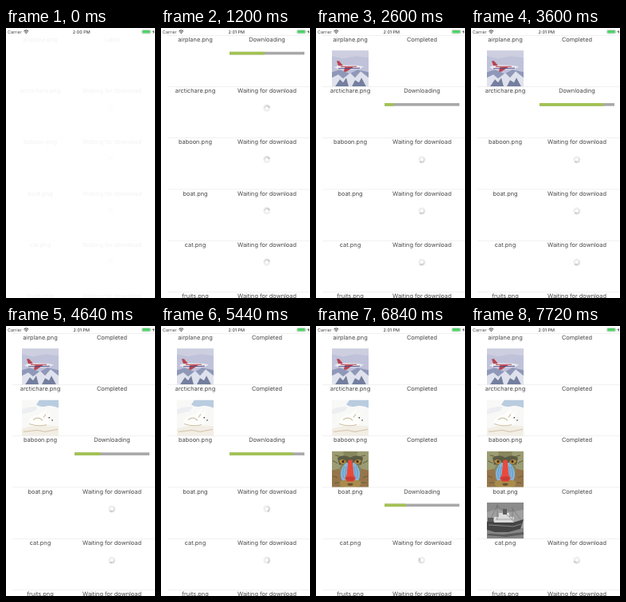
An HTML page that plays this animation: 187 by 338 pixels, repeating every 7.76 s.

```html
<!DOCTYPE html>
<html lang="en">
<head>
<meta charset="utf-8">
<title>Download list</title>
<style>
  html, body { margin: 0; width: 100%; height: 100%; overflow: hidden; background: #fff; }
  svg { display: block; }
  text { font-family: Inter, Roboto, "Liberation Sans", sans-serif; text-rendering: geometricPrecision; }
  .label { font-size: 7.4px; fill: #484848; text-anchor: middle; }
  .bar { font-size: 5.4px; fill: #444; }
</style>
</head>
<body>
<svg id="stage" width="187" height="338" viewBox="0 0 187 338">
  <g id="list"></g>
  <g id="status">
    <text class="bar" x="2" y="6.8">Carrier</text>
    <g fill="none" stroke="#333" stroke-width="1">
      <path d="M22.4 4.1a4.1 4.1 0 0 1 5.8 0M23.6 5.5a2.4 2.4 0 0 1 3.4 0"/>
    </g>
    <path d="M24.3 6.3h2l-1 1.2z" fill="#333"/>
    <text class="bar" id="clock" x="94.7" y="6.9" text-anchor="middle" font-weight="500"></text>
    <rect x="170.5" y="2.5" width="11" height="4.6" rx="1.2" fill="#fff" stroke="#aaa" stroke-width=".5"/>
    <rect x="171.2" y="3.1" width="9.6" height="3.4" rx=".7" fill="#4cd266"/>
    <path d="M182.3 4v1.6q.7-.2.7-.8t-.7-.8" fill="#aaa"/>
    <path d="M185.4 2.2l-1.6 2.9h1.2l-.5 2.3 1.9-3h-1.2z" fill="#333"/>
  </g>
</svg>
<script>
const LOOP = 7760, STEP = 40, PITCH = 64.25;
const NS = "http://www.w3.org/2000/svg";
const list = document.getElementById("list");
const clock = document.getElementById("clock");

// name, download start and end in ms
const files = [
  ["airplane.png", 400, 2110],
  ["arctichare.png", 2430, 3800],
  ["baboon.png", 4080, 5690],
  ["boat.png", 6520, 7640],
  ["cat.png", Infinity, Infinity],
  ["fruits.png", Infinity, Infinity]
];

const shape = (d, fill) => `<path d="${d}" fill="${fill}"/>`;
const line = (d, color, width) =>
  `<path d="${d}" fill="none" stroke="${color}" stroke-width="${width}"/>`;
const pair = markup => markup + `<g transform="matrix(-1 0 0 1 46 0)">${markup}</g>`;

// Each thumbnail is 46 by 45
const pictures = [
  shape("M0 0h46v45H0z", "#bfc2d9") +
  shape("M0 0h46v9L30 7 14 10 0 7z", "#cdcfe0") +
  shape("M0 27l10-3 12 5 10-5 14 3v18H0z", "#8f98b8") +
  shape("M0 34l8-4 6 5 9-7 6 6 7-8 10 8v11H0z", "#dfe2ec") +
  shape("M4 45l6-9 4 4 4-6 3 11zM25 45l4-8 5 3 3-6 6 11z", "#747f9f") +
  shape("M3 21l6-3 22 .5 9 1.5-5 3-25 1z", "#eceaf0") +
  shape("M6 13l3 0 5 6-6 0zM16 21l11-.5-9 6-3 0z", "#b8434e") +
  line("M8 22.6l27-.6", "#4f4c83", 1) +
  line("M11 20.2l20-.2", "#b8434e", 1),

  shape("M0 0h46v45H0z", "#f8f8f7") +
  shape("M22 0h24v10q-10-4-16-2T18 6z", "#b9cce0") +
  shape("M0 12q10-5 20-3l-4 5-16 4z", "#eceef1") +
  shape("M0 36q18-6 46-3v12H0z", "#f2eee5") +
  shape("M8 29q1-9 14-11l9-7-1 7 7-5-3 8q5 3 2 7-4 4-11 4H11z", "#fdfdfb") +
  line("M9 30q12 4 22 1M14 25q7-5 12 1M30 18l-3 4", "#cfc2a8", 1.2) +
  shape("M33.5 21.5h1.6v1.6h-1.6zM37 25h2v1h-2z", "#4d4944") +
  line("M2 40l17-2 10 2 16-3", "#d8cbb4", 1.2),

  shape("M0 0h46v45H0z", "#88865c") +
  pair(
    shape("M0 0h14l2 10-8 14-8 3z", "#9b9c73") +
    shape("M0 24l9-2 6 23H0z", "#96754a") +
    shape("M7 8q8-5 16 0v8L9 17z", "#5a5c45") +
    shape("M9 12q5-4 9 1l-2 3q-5 1-7-4z", "#c08d3e") +
    shape("M18 14l3 1v20l-8 2q-6-12 5-23z", "#84b6da") +
    line("M16 19q-4 8-1 15M18.5 19q-3 8-1 14", "#5c8ec0", .8) +
    `<circle cx="14" cy="13" r="1.6" fill="#332e24"/>` +
    shape("M8 38l10-2 5 2v7H12z", "#a98b4c") +
    line("M1 12l6 3M1 31l6 2M3 40l7-1M4 5l7 2", "#665c38", 1)
  ) +
  shape("M20.5 11h5l2 19 2.5 4-3 4h-8l-3-4 2.5-4z", "#ea4a3a") +
  shape("M17 33q6-3 12 0l-2 4h-8z", "#c93c34") +
  shape("M19 41q4-2 8 0l-2 2h-4z", "#665135"),

  shape("M0 0h46v45H0z", "#a0a0a0") +
  shape("M0 0h46v9L29 12 13 8 0 12z", "#8b8b8b") +
  shape("M0 32h46v13H0z", "#858585") +
  shape("M0 24l11 0 22 1 13-4-4 12-15 4H10L0 34z", "#454545") +
  shape("M9 18h25l-1 7H9zM15 13h13v5H15z", "#dcdcdc") +
  shape("M20 8h5v7h-5zM1 19h7v5H1z", "#5c5c5c") +
  line("M13 2v20M32 6v18M13 4L4 22M13 4l19 18M32 8l11 14", "#636363", .5) +
  line("M11 21h21M2 28l31 2 10-3", "#9a9a9a", .8) +
  shape("M2 39l19 1 25-3v3l-22 3L0 41z", "#5b5b5b")
];

function add(parent, tag, attrs = {}, markup = "") {
  const node = document.createElementNS(NS, tag);
  for (const key in attrs) node.setAttribute(key, attrs[key]);
  node.innerHTML = markup;
  return parent.appendChild(node);
}

function makeRow([name, start, end], i) {
  const row = add(list, "g", { transform: `translate(0 ${i * PITCH})` });
  add(row, "rect", { x: 8, y: 9, width: 179, height: .5, fill: "#e2e2e2" });
  add(row, "text", { class: "label", x: 43, y: 16.8 }, name);
  const state = add(row, "text", { class: "label", x: 133, y: 16.8 });
  const bar = add(row, "g");
  const track = { x: 86, y: 29.8, width: 94, height: 3.6 };
  add(bar, "rect", { ...track, fill: "#a8a8a8" });
  const fill = add(bar, "rect", { ...track, fill: "#a2c251" });
  const spinner = add(row, "g", { transform: "translate(132.8 36.2)" });
  const spokes = Array.from({ length: 12 }, (_, k) => add(spinner, "path", {
    d: "M0-2.4V-4.2", stroke: "#999", "stroke-width": .9,
    "stroke-linecap": "round", transform: `rotate(${k * 30})`
  }));
  const picture = add(row, "svg",
    { x: 20, y: 28.2, width: 46, height: 45, viewBox: "0 0 46 45" }, pictures[i] || "");
  return { i, start, end, state, bar, fill, spinner, spokes, picture };
}

const rows = files.map(makeRow);
const show = (node, on) => node.setAttribute("visibility", on ? "visible" : "hidden");

function drawRow(row, t) {
  const done = t >= row.end;
  const active = t >= row.start && !done;
  const waiting = t < row.start;
  row.state.textContent = done ? "Completed" : active ? "Downloading" :
    row.i ? "Waiting for download" : "Label";
  show(row.bar, active);
  show(row.spinner, waiting && row.i > 0);
  show(row.picture, done);
  if (active) row.fill.setAttribute("width", 94 * (t - row.start) / (row.end - row.start));
  const head = Math.floor(t * 12 / 1000);
  row.spokes.forEach((spoke, k) => {
    const age = (head - k + 12 * LOOP) % 12;
    spoke.setAttribute("opacity", Math.max(.3, .9 - age * .1));
  });
}

function draw(now) {
  const t = Math.floor(now % LOOP / STEP) * STEP;
  list.setAttribute("opacity", Math.min(1, .07 + t / 320));
  clock.textContent = t < 400 ? "2:00 PM" : "2:01 PM";
  rows.forEach(row => drawRow(row, t));
}

const origin = performance.now();
function tick() {
  draw(performance.now() - origin);
  requestAnimationFrame(tick);
}
tick();
</script>
</body>
</html>
```
